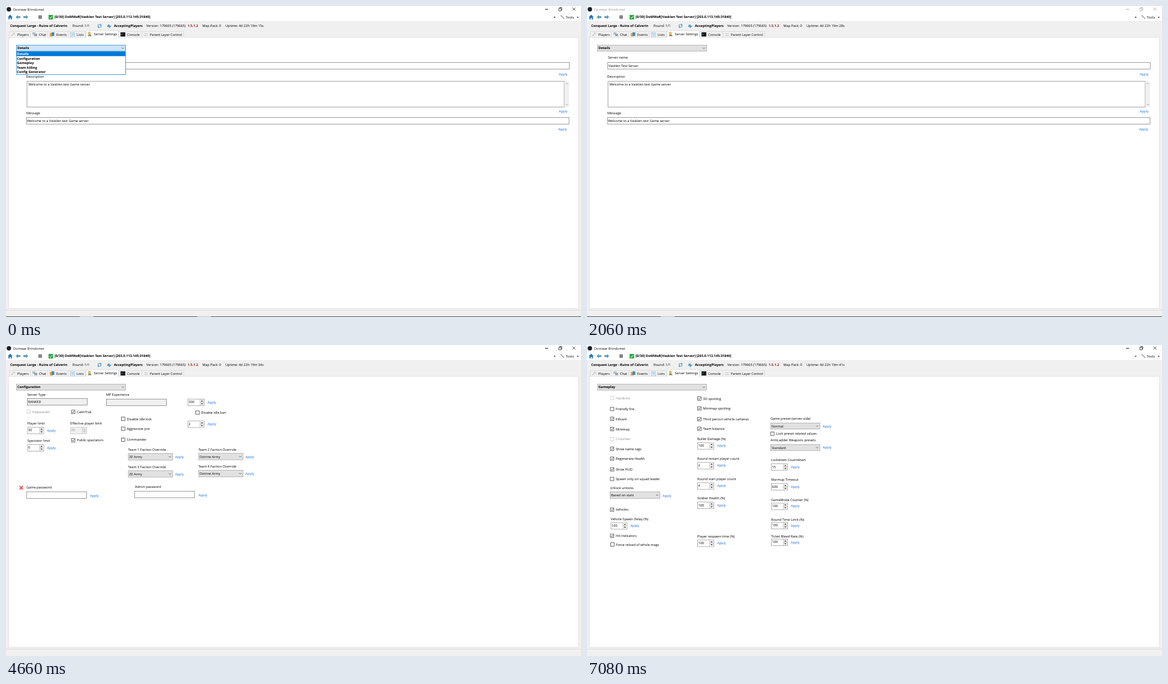
Recreate the animation shown at these times as an HTML page. Size 959x520 px, loop 8 s.

```html
<!DOCTYPE html>
<html lang="en">
<head>
<meta charset="utf-8">
<style>
html, body { margin: 0; width: 100%; height: 100%; overflow: hidden; background: #f0f0f0 }
svg { display: block }
text { font: 5.6px "Open Sans", "Noto Sans", sans-serif; fill: #000; text-rendering: geometricPrecision }
.b { font-weight: 700 }
.link { fill: #1670e8 }
.dim { fill: #8c8c8c }
.red { font-weight: 700; fill: #a02020 }
.inv { font-weight: 700; fill: #fff }
</style>
</head>
<body>
<svg id="stage" width="959" height="520" viewBox="0 0 959 520"></svg>
<script>
// Text is placed by its left edge and vertical middle.
const text = (x, y, s, cls = '', id = '') => `<text x="${x}" y="${y + 2}" class="${cls}" id="${id}">${s}</text>`;
const fill = (x, y, w, h, c) => `<rect x="${x}" y="${y}" width="${w}" height="${h}" fill="${c}"/>`;
const box = (x, y, w, h, bg = '#fff', edge = '#6a6a6a') =>
  `<rect x="${x + .5}" y="${y + .5}" width="${w}" height="${h}" fill="${bg}" stroke="${edge}" stroke-width=".65"/>`;
const line = (d, c = '#444', w = 1) => `<path d="${d}" fill="none" stroke="${c}" stroke-width="${w}"/>`;
const shape = (d, c) => `<path d="${d}" fill="${c}"/>`;
const dot = (x, y, r, c) => `<circle cx="${x}" cy="${y}" r="${r}" fill="${c}"/>`;
const chevron = (x, y, c = '#555') => line(`M${x - 2} ${y - 1}l2 2 2-2`, c, .8);
const triangle = (x, y, dir = 1, c = '#333') => shape(`M${x - 1.7} ${y - dir}h3.4l-1.7 ${2 * dir}z`, c);
const apply = (x, y) => text(x, y, 'Apply', 'link');

const combo = (x, y, w, s, h = 11) =>
  box(x, y, w, h, '#e1e1e1', '#999') + text(x + 2, y + h / 2 + .5, s) + chevron(x + w - 4, y + h / 2 + .5);

const check = (x, y, s, on = true, off = false) =>
  `<rect x="${x + .5}" y="${y - 2.9}" width="5.8" height="5.8" fill="#fff" stroke="${off ? '#ccc' : '#444'}" stroke-width=".8"/>` +
  (on ? line(`M${x + 1.7} ${y}l1.3 1.4 2.3-2.8`, off ? '#bbb' : '#222', .8) : '') +
  text(x + 9.5, y, s, off ? 'dim' : '');

const spin = (x, y, s, off = false) =>
  box(x, y - 6, 27, 11, off ? '#f0f0f0' : '#fff', off ? '#bbb' : '#888') +
  fill(x + 20, y - 5, 7, 10, '#eee') + line(`M${x + 20.5} ${y - 5}v10M${x + 20} ${y}h7`, '#bbb', .6) +
  triangle(x + 23.8, y - 2.6, -1, off ? '#aaa' : '#333') + triangle(x + 23.8, y + 2.6, 1, off ? '#aaa' : '#333') +
  text(x + 1.5, y - .7, s, off ? 'dim' : '');
const spinApply = (x, y, s) => spin(x, y, s) + apply(x + 33, y - .4);
const labelled = (x, y, label, ySpin, s) => text(x, y, label) + spinApply(x, ySpin, s);

const arrow = (x, dir) => shape(`M${x} 18.5l${4 * dir}-3.6v2.2h${4 * dir}v2.8h${-4 * dir}v2.2z`, '#5f9dbd');
const cycle = (x, y) => line(`M${x - 2.5} ${y + 1}v-3h4M${x + 2.5} ${y - 1}v3h-4`, '#5a9fc8', 1) +
  shape(`M${x + 1} ${y - 4}l2.5 2-2.5 2zM${x - 1} ${y + 4}l-2.5-2 2.5-2z`, '#5a9fc8');

const tabs = [[19, 'Players', 41], [55, 'Chat', 70], [84, 'Events', 104], [118, 'Lists', 133],
  [146.5, 'Server Settings', 188], [202, 'Console', 227], [240, 'Parent Layer Control', 297]];

const chrome = [
  fill(0, 0, 959, 25, '#fff'),
  dot(4.8, 5.5, 3.7, '#162029'),
  text(12, 5.8, 'Domwar Brindomet', '', 'title'),
  '<g id="buttons">', line('M899 5.5h5', 'currentColor'), line('M922 4h4v4h-4zM923.5 4v-1.5h3.5v4h-1.2', 'currentColor', .8),
  line('M944.7 2.7l5 5m0-5l-5 5', 'currentColor', .8), '</g>',
  shape('M3 18.5l4-4 4 4h-1.2v4h-2v-2.5h-1.7v2.5h-2v-4z', '#2676b8'), arrow(16, 1), arrow(37, -1),
  fill(54, 15.5, 6, 6, '#858585'),
  fill(71, 15, 7.5, 7.5, '#25a83c'), line('M72.6 18.8l1.7 1.8 2.8-3.8', '#fff'),
  text(81, 18.4, '[0/30] DoMWaR[Vasklen Test Server] [203.0.113.145:31840]', 'b'),
  triangle(915, 19), triangle(953.5, 19), line('M925 15.5l6 6', '#aab2b8', 1.8), text(933.5, 19, 'Tools'),
  text(7, 33, 'Conquest Large - Ruins of Calverin', 'b'), text(111, 33, 'Round: 1/1'),
  cycle(156, 33.3), shape('M168.5 35c0-5 5-5 5-2h2.5l-3.5 4-3-3h2z', '#5a9fc8'),
  text(180, 33, 'AcceptingPlayers', 'b'), text(234, 33, 'Version: 179665 (179665)'),
  text(303, 33, '1.5.1.2', 'red'), text(327.5, 33, 'Map Pack: 0'), text(366, 33, '', '', 'uptime'),
  box(4, 52, 950, 453, '#fff', '#dcdcdc'),
  line('M5.5 52v-9.5h291v10', '#dedede'), fill(134, 41, 54, 13, '#fff'), line('M133.5 53v-12h54v12', '#dcdcdc'),
  ...tabs.map(([x, s, end], i) => text(x, i === 4 ? 47.2 : 48, s) + line(`M${end - .5} 43v9`, '#dcdcdc')),
  line('M9 50l6-5', '#99a', 1), dot(13, 46, 2, '#dcd9d4'),
  fill(44, 44, 5, 4, '#b4c3cc'), fill(47, 46.5, 5, 4, '#8fa5b4'),
  fill(73, 45, 5, 6, '#e0a64c'), fill(76, 44, 4.5, 6, '#4588bd'),
  box(107, 44, 7, 7, '#dceefa', '#9cc3de'), line('M109 46.5h4m-4 2h4', '#7fb0d0', .7),
  dot(139, 45.5, 2.4, '#e5bb58'), shape('M136 50.5l2-3h3l2 3z', '#8a8d70'),
  fill(191, 44, 8, 7, '#17191c'), line('M192.5 46l1.5 1.2-1.5 1.2', '#72b4e0', .7),
  line('M230.5 46.5h6M230.5 49.5h6', '#bcc3c8', 1),
  line('M0 508.5h959', '#dcdcdc')
].join('');

const welcome = 'Welcome to a Vasklen.test Game server';
const details = [
  text(35, 86.4, 'Server name'), box(34, 94, 905, 11), text(35.7, 99.5, 'Vasklen Test Server'), apply(922, 113.5),
  text(33.5, 118, 'Description'), box(34.5, 125.5, 896, 43), text(37.3, 131, welcome),
  fill(931.5, 126, 7.5, 43, '#f0f0f0'), line('M933.5 131l2-2 2 2M933.5 164l2 2 2-2', '#999', .8), apply(922, 176),
  text(34, 178.5, 'Message'), box(33.5, 186, 905, 11), text(35, 191.5, welcome), apply(921, 205.5)
].join('');

const mode = s => box(17, 65, 182, 10, '#e1e1e1', '#999') + text(19, 70.4, s, 'b') + chevron(195, 70.5);

const openList = fill(19, 78, 181.5, 37.5, '#0001') +
  box(17, 65, 182, 10, '#cce4f7', '#0078d7') + text(19, 70.4, 'Details', 'b') + chevron(195, 70.5) +
  box(17, 76, 182, 38, '#fff', '#0078d7') + fill(17.5, 76.5, 181.5, 7.3, '#0078d7') +
  ['Details', 'Configuration', 'Gameplay', 'Team killing', 'Config Generator']
    .map((s, i) => text(18.3, 80.4 + i * 7.5, s, i ? 'b' : 'inv')).join('');

const faction = (n, x, y, army) => text(x, y, `Team ${n} Faction Override`) + combo(x, y + 6, 74, army) + apply(x + 78.5, y + 12.3);

const configuration = [
  mode('Configuration'),
  text(35.5, 83, 'Server Type'), box(35, 89, 100, 11, '#f0f0f0'), text(36.7, 94.7, 'RANKED'),
  text(167, 83.3, 'MP Experience'), box(167, 90, 100, 11, '#f0f0f0'),
  spinApply(303, 96, '300'), check(316, 113, 'Disable idle ban', false), spinApply(303, 132.5, '2'),
  check(34.5, 111.5, 'Kelpwarder', true, true), check(108.7, 111.8, 'CalmTrial'),
  check(192, 123.5, 'Disable idle kick', false), check(192, 140, 'Aggressive join', false), check(192, 158.3, 'Commander', false),
  labelled(35.5, 131, 'Player limit', 143, '30'), text(107.3, 131, 'Effective player limit'), spin(107, 143, '30', true),
  labelled(35.5, 160, 'Spectator limit', 172, '0'), check(108.7, 159.3, 'Public spectators'),
  faction(1, 203.5, 175, 'ZE Army'), faction(2, 320.7, 174.5, 'Ostrine Army'),
  faction(3, 203.5, 203.5, 'ZE Army'), faction(4, 320.7, 203, 'Ostrine Army'),
  line('M22.8 236l5.5 5.5m0-5.5l-5.5 5.5', '#dd5a55', 1.9),
  text(34, 238.3, 'Game password'), box(34, 245, 100, 11), apply(140, 251.5),
  text(215, 237, 'Admin password'), box(214, 244, 100, 11), apply(321, 250.8)
].join('');

const gameplay = [
  mode('Gameplay'),
  check(38.5, 88.5, 'Hardcore', false, true), check(38.5, 107, 'Friendly fire', false),
  check(38.5, 123.5, 'Killcam'), check(38.5, 140.5, 'Minimap'), check(38.5, 157.3, 'Crosshair', false, true),
  check(38.5, 173.5, 'Show name tags'), check(38.5, 190, 'Regenerate Health'), check(38.5, 208, 'Show HUD'),
  check(38.5, 224, 'Spawn only on squad leader', false),
  text(38.5, 239, 'Unlock unlocks'), combo(38, 245, 83, 'Based on stats'), apply(126, 251.5),
  check(38.5, 275.3, 'Vehicles'), labelled(39.5, 290.7, 'Vehicle Spawn Delay (%)', 302.5, '100'),
  check(38.5, 319, 'Hit Indicators'), check(39, 333.5, 'Force reload of whole mags', false),
  check(184, 89.5, '3D spotting'), check(184, 106, 'Minimap spotting'),
  check(184, 124, 'Third person vehicle cameras'), check(184, 140, 'Team balance'),
  labelled(184, 156.5, 'Bullet Damage (%)', 168.7, '100'),
  labelled(184, 189.5, 'Round restart player count', 201.7, '2'),
  labelled(184, 223.5, 'Round start player count', 235.7, '4'),
  labelled(184, 256, 'Soldier Health (%)', 268.2, '100'),
  labelled(184, 319.5, 'Player respawn time (%)', 331.5, '100'),
  text(306, 123, 'Game preset (server side)'), combo(306, 130, 82, 'Normal', 10), apply(393, 135.5),
  check(305.8, 148.3, 'Lock preset related values', false),
  text(306, 159, 'ArmLadder Weapons presets'), combo(306, 166, 82, 'Standard', 10), apply(393, 171.3),
  labelled(307, 192, 'Lockdown Countdown', 204.2, '15'),
  labelled(307, 225, 'Warmup Timeout', 237.3, '600'),
  labelled(307, 259, 'GameMode Counter (%)', 269.7, '100'),
  labelled(307, 291.5, 'Round Time Limit (%)', 302, '100'),
  labelled(307, 319.5, 'Ticket Bleed Rate (%)', 330, '100')
].join('');

const edge = d => line('M0 519.5h959', '#c4c4c4') + line(d, '#555');
const scenes = [
  { start: 0, sec: 15, art: details + openList + edge('M0 519.5h123m23 0h173m23 0h617') },
  { start: 500, sec: 28, idle: true, art: mode('Details') + details + edge('M0 519.5h123m23 0h813') },
  { start: 3100, sec: 34, art: configuration },
  { start: 5700, sec: 41, art: gameplay }
];

const $ = id => document.getElementById(id);
$('stage').innerHTML = chrome + '<g id="page"></g>';
let shown;

function draw() {
  const t = performance.now() % 8000;
  const scene = scenes.findLast(s => t >= s.start);
  if (scene !== shown) {
    shown = scene;
    $('page').innerHTML = scene.art;
    $('uptime').textContent = `Uptime: 4d 22h 19m ${scene.sec}s`;
    $('title').style.fill = scene.idle ? '#999' : '#111';
    $('buttons').style.color = scene.idle ? '#aaa' : '#222';
  }
  requestAnimationFrame(draw);
}
draw();
</script>
</body>
</html>
```
